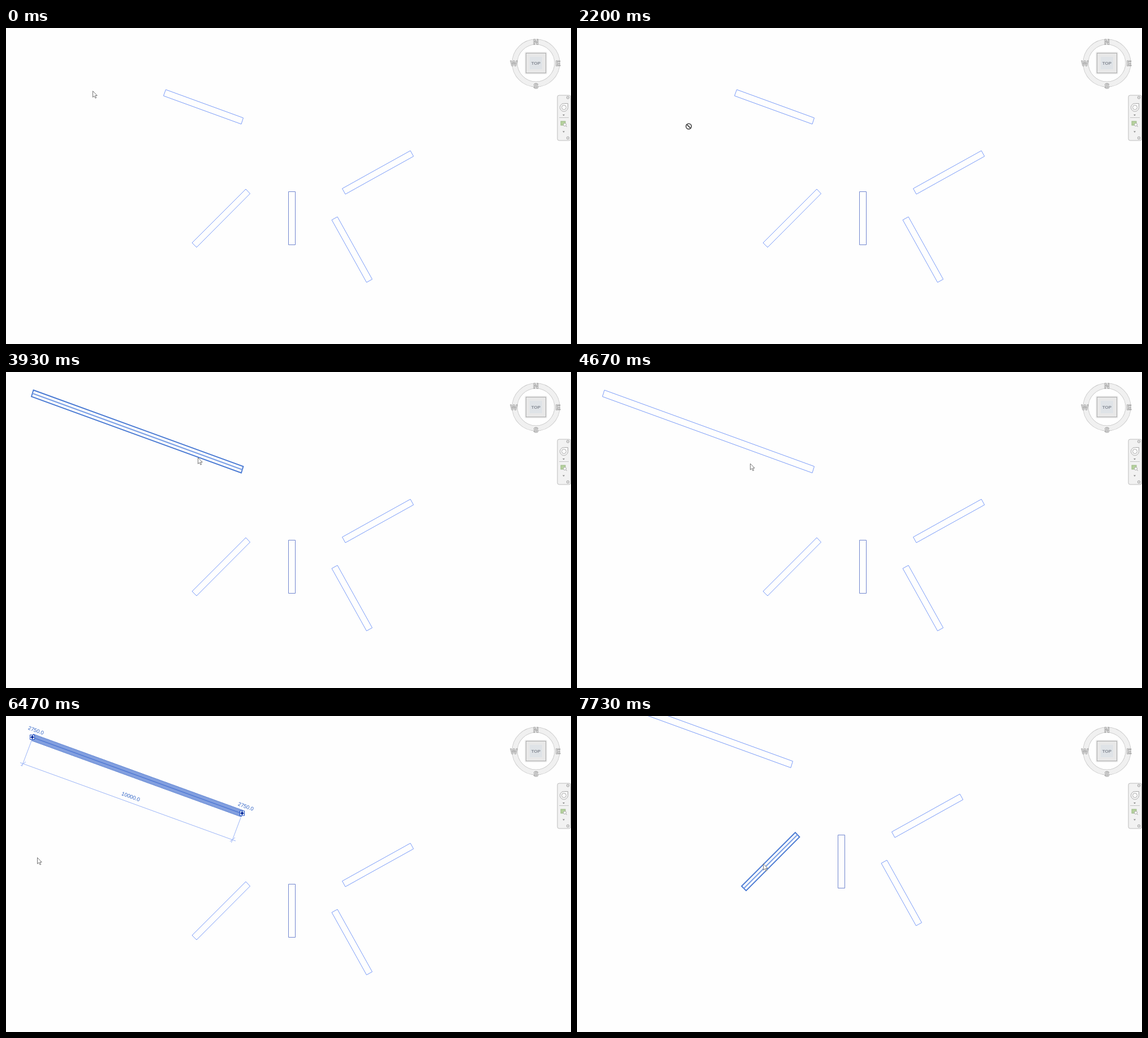
Recreate the animation shown at these times as an HTML page. Size 999 px wide and 559 px high, loop 8000 ms.

```html
<!DOCTYPE html>
<html lang="en">
<head>
<meta charset="utf-8">
<title>Wall extension</title>
<style>
html, body { margin: 0; height: 100%; overflow: hidden; background: #fefefe; }
svg { display: block; width: 999px; height: 559px; font-family: "Liberation Sans", Arial, sans-serif; }
text { text-anchor: middle; }
.bar polygon { fill: none; stroke: #7b9cf8; }
.bar line { display: none; stroke: #7ba0e6; stroke-width: 2; }
.hi polygon { stroke: #4a7ad3; stroke-width: 1.9; }
.hi line, .sel line { display: inline; }
.sel polygon { fill: #829fdf; stroke: #3463c4; stroke-dasharray: 1.5 1; }
.sel line { stroke: #3b69cf; stroke-width: 1; }
.sel.hi polygon { stroke: #2455be; stroke-width: 2.2; }
.sel.hi line { stroke: #2455be; stroke-width: 2; }
#dims path { fill: none; stroke: #9bb4f7; }
#dims text { font-size: 9.4px; fill: #2d61c4; }
#dims .grip { stroke: #2453c4; fill: #fff; }
#compass text { font: bold 13px "Liberation Sans", Arial, sans-serif; fill: #fafafa; stroke: #999; stroke-width: .9; }
#compass .face { font-size: 8px; fill: #858b94; stroke: none; }
#nav { fill: none; stroke: #a9a9a9; }
#nav .tri { fill: #888; stroke: none; }
</style>
</head>
<body>
<svg viewBox="0 0 999 559">
  <g id="view">
    <g id="bars"></g>
    <g id="dims" transform="translate(0 -8)">
      <path d="M45 44L28 89M415 180L398.500 224M25 82.500L406 221M26 88l9-7M396 222l9-7"/>
    </g>
  </g>

  <rect id="menu" x="163.500" y="-10" width="159" height="13.500" stroke="#b9b9b9"/>

  <g id="compass">
    <circle cx="937" cy="62" r="37.500" fill="none" stroke="#c6c6c6" stroke-width="10"/>
    <circle cx="937" cy="62" r="37.500" fill="none" stroke="#f0f0f0" stroke-width="8.500"/>
    <text x="937" y="28.500">N</text>
    <text x="976" y="67">E</text>
    <text x="937" y="106.500">S</text>
    <text x="898" y="67">W</text>
    <rect x="917" y="42" width="40" height="40" rx="3" fill="#eee"/>
    <rect x="919.500" y="44.500" width="35" height="35" fill="#e8e8e8" stroke="#aaa"/>
    <rect x="926" y="51" width="22" height="22" fill="#dfe3e7"/>
    <text class="face" x="937" y="65">TOP</text>
  </g>

  <g id="nav">
    <rect x="975" y="119" width="23.500" height="80" rx="3" fill="#f2f2f2" stroke="#bcbcbc"/>
    <circle cx="993.500" cy="123" r="2.300" fill="#ddd"/>
    <circle cx="993.500" cy="194.500" r="2.300" fill="#ddd"/>
    <path d="M986.500 133.500h7v7a7 7 0 1 1-7-7z" fill="#fafafa"/>
    <circle cx="986.500" cy="140.500" r="4"/>
    <path d="M978 158.500h17" stroke="#c4c4c4"/>
    <rect x="981" y="165" width="8" height="7" fill="#b5d19c" stroke="#9bb987"/>
    <circle cx="988" cy="171" r="2.500" fill="#fff"/>
    <path d="M990 173l2 2"/>
    <path class="tri" d="M984 153h4l-2 2.500zM984 182.500h4l-2 2.500z"/>
  </g>

  <path id="arrow" d="M.5.5v11l2.500-2.300 2 4 1.700-.8-1.900-3.900h3.400z" fill="#fff" stroke="#666" stroke-width=".9"/>
  <g id="deny" fill="#fff" stroke="#3a3a3a" stroke-width="1.500">
    <circle r="4.800"/>
    <path d="M-3.400-3.400L3.400 3.400"/>
  </g>
</svg>
<script>
const LOOP = 8000;
const $ = id => document.getElementById(id);
const make = (parent, tag, attrs) => {
  const el = document.createElementNS("http://www.w3.org/2000/svg", tag);
  for (const k in attrs) el.setAttribute(k, attrs[k]);
  return parent.appendChild(el);
};

// Corners run along one long side and back along the other.
const SHORT = [282.5, 109, 419.5, 159, 416, 170, 278.5, 120];
const LONG = [48.5, 24, 419.5, 159, 416, 170.5, 45, 35.5];
const shapes = [
  SHORT,
  [424, 285, 329, 380, 337, 388, 431.5, 293],
  [499.5, 289.5, 499.5, 383.5, 511.5, 383.5, 511.5, 289.5],
  [715, 217, 594.5, 284, 600, 294, 720.5, 227],
  [586, 334, 647.5, 444.5, 637.5, 450, 576, 339.5]
];

function shape(bar, p) {
  const [outline, axis] = bar.children;
  outline.setAttribute("points", p);
  axis.setAttribute("x1", (p[0] + p[6]) / 2);
  axis.setAttribute("y1", (p[1] + p[7]) / 2);
  axis.setAttribute("x2", (p[2] + p[4]) / 2);
  axis.setAttribute("y2", (p[3] + p[5]) / 2);
}
const bars = shapes.map(p => {
  const bar = make($("bars"), "g", { class: "bar" });
  make(bar, "polygon");
  make(bar, "line");
  shape(bar, p);
  return bar;
});
bars[2].firstChild.style.stroke = "#7186cf";

for (const [x, y, label] of [[52, 28.5, "2750.0"], [423, 163, "2750.0"], [219.5, 145.5, "10000.0"]])
  make($("dims"), "text", { transform: `translate(${x} ${y}) rotate(20)` }).textContent = label;
for (const [x, y] of [[46.5, 37.5], [417.5, 172]]) {
  make($("dims"), "rect", { class: "grip", x: x - 4, y: y - 4, width: 8, height: 8 });
  make($("dims"), "path", { d: `M${x - 4} ${y}h8M${x} ${y - 4}v8`, style: "stroke:#2453c4" });
  make($("dims"), "circle", { cx: x, cy: y, r: 2.4, fill: "#0c2f9c" });
}

// Keys are [time, x, y, kind]; the kind holds until the next key.
const HIDDEN = 0, ARROW = 1, DENY = 2;
const cursorKeys = [
  [0, 153, 111, ARROW], [70, 153, 111, ARROW], [70, 174, 78, ARROW], [130, 174, 78, ARROW],
  [130, 193.5, 49.5, DENY], [600, 193.5, 49.5, HIDDEN],
  [1860, 208, 30, DENY], [2200, 197.5, 174, DENY], [2330, 197.5, 174, DENY],
  [2400, 190, 172, DENY], [2600, 190, 172, DENY], [3000, 335.5, 159, DENY],
  [3070, 335.5, 159, DENY], [3330, 339, 151, ARROW], [4130, 339, 151, ARROW],
  [4330, 320, 208, ARROW], [4530, 306, 162, ARROW], [4670, 306, 162, ARROW],
  [4730, 301, 132, ARROW], [5400, 301, 132, ARROW], [5600, 190, 227, HIDDEN],
  [6470, 55, 250, ARROW], [6530, 55, 250, ARROW], [6730, 208, 250, ARROW],
  [6930, 208, 250, ARROW], [7130, 340, 335, ARROW], [7460, 302, 248, ARROW],
  [7730, 329, 261, ARROW], [LOOP, 329, 261, ARROW]
];
const panKeys = [
  [0, 0, 0], [2670, 0, 0], [2900, 0, 8], [7130, 0, 8], [7460, -38, -79], [LOOP, -38, -79]
];

function sample(keys, t) {
  const i = keys.findIndex(k => k[0] > t);
  const a = keys[i - 1], b = keys[i];
  const f = (t - a[0]) / (b[0] - a[0]);
  return [a[1] + (b[1] - a[1]) * f, a[2] + (b[2] - a[2]) * f, a[3]];
}
const show = (el, on) => el.style.display = on ? "" : "none";
const place = (el, x, y) => el.setAttribute("transform", `translate(${x} ${y})`);

function draw() {
  const t = performance.now() % LOOP;
  const during = (from, to) => t >= from && t < to;

  const [px, py] = sample(panKeys, t);
  place($("view"), Math.round(px), Math.round(py));

  const selected = during(5130, 6930);
  shape(bars[0], t < 3930 ? SHORT : LONG);
  bars[0].classList.toggle("hi", during(3330, 4200) || during(4700, 5460));
  bars[0].classList.toggle("sel", selected);
  bars[1].classList.toggle("hi", t >= 7700);
  show($("dims"), selected);

  show($("menu"), during(600, 1730));
  $("menu").setAttribute("fill", during(1130, 1330) ? "#dcebf8" : "#f3f3f3");

  const [x, y, kind] = sample(cursorKeys, t);
  show($("arrow"), kind === ARROW);
  show($("deny"), kind === DENY);
  place($("arrow"), x, y);
  place($("deny"), x, y);
  requestAnimationFrame(draw);
}
draw();
</script>
</body>
</html>
```
